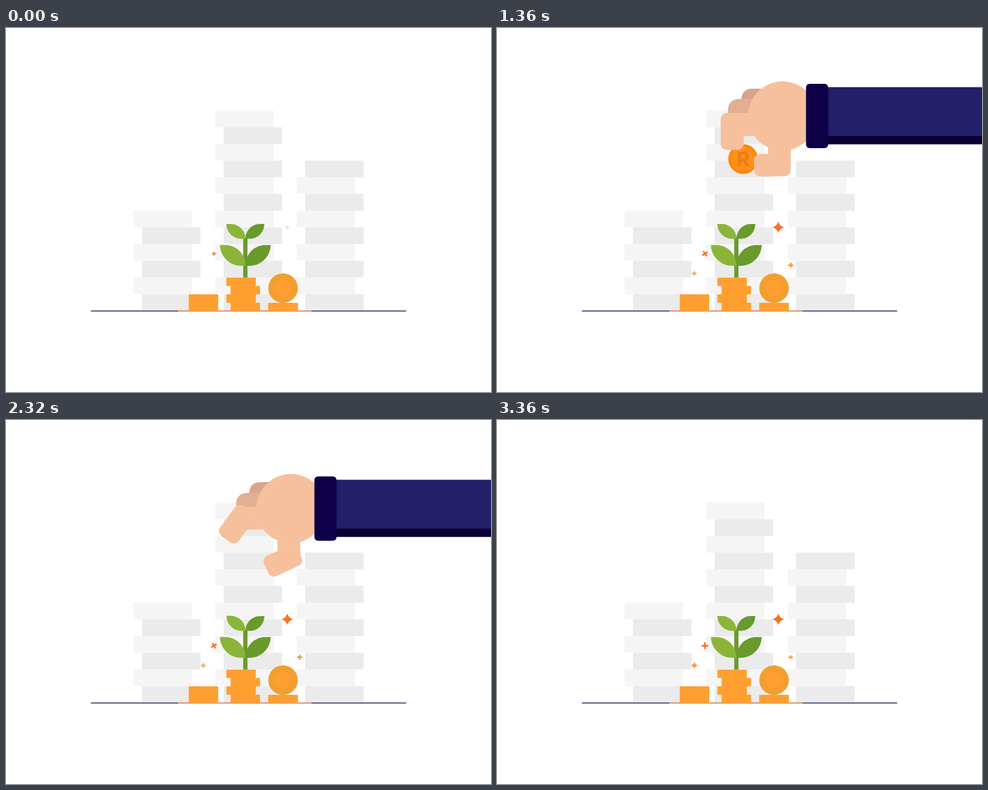
Animation of 800x600 px, one loop 3400 ms. Source, as an HTML page:

```html
<!DOCTYPE html>
<html lang="en">
<head>
<meta charset="utf-8">
<title>Growing savings</title>
<style>
  html, body { margin: 0; width: 100%; height: 100%; overflow: hidden; background: #fff; }
  svg { display: block; width: 800px; height: 600px; }
  text { font: 800 32px Inter, Arial, sans-serif; text-anchor: middle; }
</style>
</head>
<body>
<svg viewBox="0 0 800 600">
  <clipPath id="aboveStack"><path d="M0 0H800V411.5H0Z"/></clipPath>
  <g id="towers"></g>

  <path d="M140 466.4H660" stroke="#25205f" stroke-width="1.5"/>
  <path d="M284 466.4H504" stroke="#ff9d5c" stroke-width="1.5"/>

  <g clip-path="url(#aboveStack)">
    <g id="coin">
      <circle r="24.5" fill="#ff8705"/>
      <circle r="20.5" fill="#ff9019"/>
      <text y="12" fill="#eb7f14">R</text>
    </g>
  </g>

  <g fill="#ff9f30">
    <path d="M301.5 439H350V466H301.5Z M432.5 453H481.5V466H432.5Z"/>
    <path d="M363.5 411.5H412V425.3H419V439H412V452.8H419V466H370.5V452.8H363.5V439H370.5V425.3H363.5Z"/>
    <circle cx="457" cy="428.8" r="24.4" fill="#f29f30"/>
    <circle cx="457" cy="428.8" r="14"/>
  </g>

  <g fill="#699a2c">
    <path d="M391.3 346H398.3V411.5H391.3Z"/>
    <path d="M436.5 357.7H428C409 357.7 395 373 395 392H402C421 392 436.5 376 436.5 357.7Z"/>
    <path fill="#8bb538" d="M353 357.7H361.500C380.500 357.700 395 373 395 392H388C368.500 392 353 376 353 357.700Z"/>
    <path class="leaf" d="M426 323H419C405.500 323 395 334 395 347.500H402C415.500 347.500 426 336.500 426 323Z"/>
    <path class="leaf" fill="#8bb538" d="M363.500 323H370.500C384 323 395 334 395 347.500H388C374.500 347.500 363.500 336.500 363.500 323Z"/>
  </g>

  <g id="sparkles"></g>

  <!-- origin: middle of the cuff; the palm sits 57 to its left -->
  <g id="arm">
    <path fill="#231f68" d="M17 -47.500H520V34H17Z"/>
    <path fill="#0c0034" d="M17 33H520V46.800H17Z"/>
    <g transform="translate(-57 0)">
      <g id="hand" fill="#f6c09c">
        <path fill="#daa58b" d="M-20 -45H-50Q-67 -45 -68 -27H-20Z"/>
        <path fill="#e3af92" d="M-20 -28H-72Q-90 -27 -90 -9V-3H-20Z"/>
        <path d="M-83 -5H-20V33H-83Z"/>
        <rect id="index" x="-102" y="-5" width="38" height="61" rx="10"/>
        <path d="M-24 30H13.500V81H-24Z"/>
        <rect id="thumb" x="-47" y="62.500" width="60.500" height="37" rx="10"/>
      </g>
      <circle r="57" fill="#f6c09c"/>
    </g>
    <rect x="-18.300" y="-53" width="36.600" height="106" rx="6" fill="#0d0046"/>
  </g>
</svg>
<script>
const LOOP = 3400, STEP = 40, RELEASE = 1800, PULSE = 960;
const $ = id => document.getElementById(id);
const rad = Math.PI / 180;
const set = (el, value) => el.setAttribute('transform', value);

// Eased value between [time, value] keys
function ease(t, keys) {
  if (t <= keys[0][0]) return keys[0][1];
  for (let i = 1; i < keys.length; i++) {
    const [t0, v0] = keys[i - 1], [t1, v1] = keys[i];
    if (t < t1) {
      const s = (t - t0) / (t1 - t0);
      return v0 + (v1 - v0) * s * s * (3 - 2 * s);
    }
  }
  return keys[keys.length - 1][1];
}

// Grey towers: x of the light rows and index of the first row
$('towers').innerHTML = [[210.3, 6], [345, 0], [479.3, 3]].map(([x, first]) => {
  let rows = '';
  for (let k = first; k < 12; k++) {
    const dark = k % 2;
    rows += `<rect x="${x + dark * 14}" y="${136 + k * 27.5}" width="96.5" height="27.5" fill="${dark ? '#ebebeb' : '#f5f5f5'}"/>`;
  }
  return rows;
}).join('');

const STAR = 'M0 -1Q.22 -.22 1 0Q.22 .22 0 1Q-.22 .22 -1 0Q-.22 -.22 0 -1Z';
const PLUS = 'M-1 -.25H-.25V-1H.25V-.25H1V.25H.25V1H-.25V.25H-1Z';
const sparkles = [
  { x: 464, y: 328.5, shape: STAR, color: '#ff6d1c', delay: 0, min: 4.5, max: 9.5, grow: 6, fade: 0.22 },
  { x: 343, y: 372, shape: PLUS, color: '#ff6d1c', delay: 0, min: 3.5, max: 5.5, grow: 2, fade: 1 },
  { x: 325.5, y: 404.5, shape: STAR, color: '#ff9433', delay: 160, min: 3.3, max: 6.5, grow: 4, fade: 0.3 },
  { x: 484.5, y: 391, shape: PLUS, color: '#ff8f1f', delay: 480, min: 3.7, max: 6.5, grow: 5, fade: 1 }
];
$('sparkles').innerHTML = sparkles.map(s => `<path d="${s.shape}" fill="${s.color}"/>`).join('');

function drawSparkle(s, el, t) {
  const phase = (t - s.delay) % PULSE / PULSE;
  const w = 1 - Math.abs(1 - 2 * phase);
  el.style.display = t < s.delay ? 'none' : '';
  if (t < s.delay) return;
  const turn = s.shape === PLUS ? 90 * w ** 2.5 : 0;
  set(el, `translate(${s.x} ${s.y}) rotate(${turn}) scale(${Math.min(s.max, s.min + s.grow * w)})`);
  el.setAttribute('opacity', Math.min(1, s.fade + 0.9 * w));
}

function armPose(t) {
  const tilt = ease(t, [[240, -4.7], [660, 2.9], [760, 2.85], [1360, 0]]);
  const bend = ease(t, [[260, -10.5], [740, 10], [1360, 0], [1660, 4], [2030, -14], [2400, 0]]);
  const drop = ease(t, [[1360, 0], [1660, -4.5], [2030, 15], [2280, 1]]);
  let x = ease(t, [[700, 525], [1360, 528], [2100, 528], [2600, 525.5]]);
  if (t < 700) x += 455 * (1 - t / 700) ** 2;
  if (t > 2600) x += 475 * ((t - 2600) / 700) ** 2;
  return { x, y: 145 + drop - 200 * Math.sin(tilt * rad), tilt, bend };
}

// Place of the coin between finger and thumb
function grip(p) {
  const a = p.tilt * rad, b = a + p.bend * rad;
  return {
    x: p.x - 57 * Math.cos(a) - 65 * Math.cos(b) - 71 * Math.sin(b),
    y: p.y - 57 * Math.sin(a) - 65 * Math.sin(b) + 71 * Math.cos(b),
    turn: p.tilt + p.bend
  };
}

function draw(t) {
  const pose = armPose(t);
  set($('arm'), `translate(${pose.x} ${pose.y}) rotate(${pose.tilt})`);
  set($('hand'), `rotate(${pose.bend})`);
  set($('index'), `rotate(${ease(t, [[1760, 0], [2200, 38]])} -83 14)`);
  set($('thumb'), `rotate(${ease(t, [[1760, 0], [2200, -23]])} -5 81)`);

  const coin = grip(armPose(Math.min(t, RELEASE)));
  if (t > RELEASE) {
    const s = (t - RELEASE) / 240;
    coin.x += (396 - coin.x) * s;
    coin.y += (377.5 - coin.y) * s * s;
  }
  set($('coin'), `translate(${coin.x} ${coin.y}) rotate(${coin.turn})`);

  const since = Math.max(0, t - 1960);
  const sway = 5 * Math.sin(since / 160 * Math.PI) * Math.exp(-since / 150) * (since < 600) * 1.35;
  document.querySelectorAll('.leaf').forEach(leaf => set(leaf, `rotate(${sway} 395 347.5)`));

  sparkles.forEach((s, i) => drawSparkle(s, $('sparkles').children[i], t));
}

const start = performance.now();
function tick() {
  const t = (performance.now() - start) % LOOP;
  draw(Math.floor(t / STEP) * STEP);
  requestAnimationFrame(tick);
}
tick();
</script>
</body>
</html>
```
